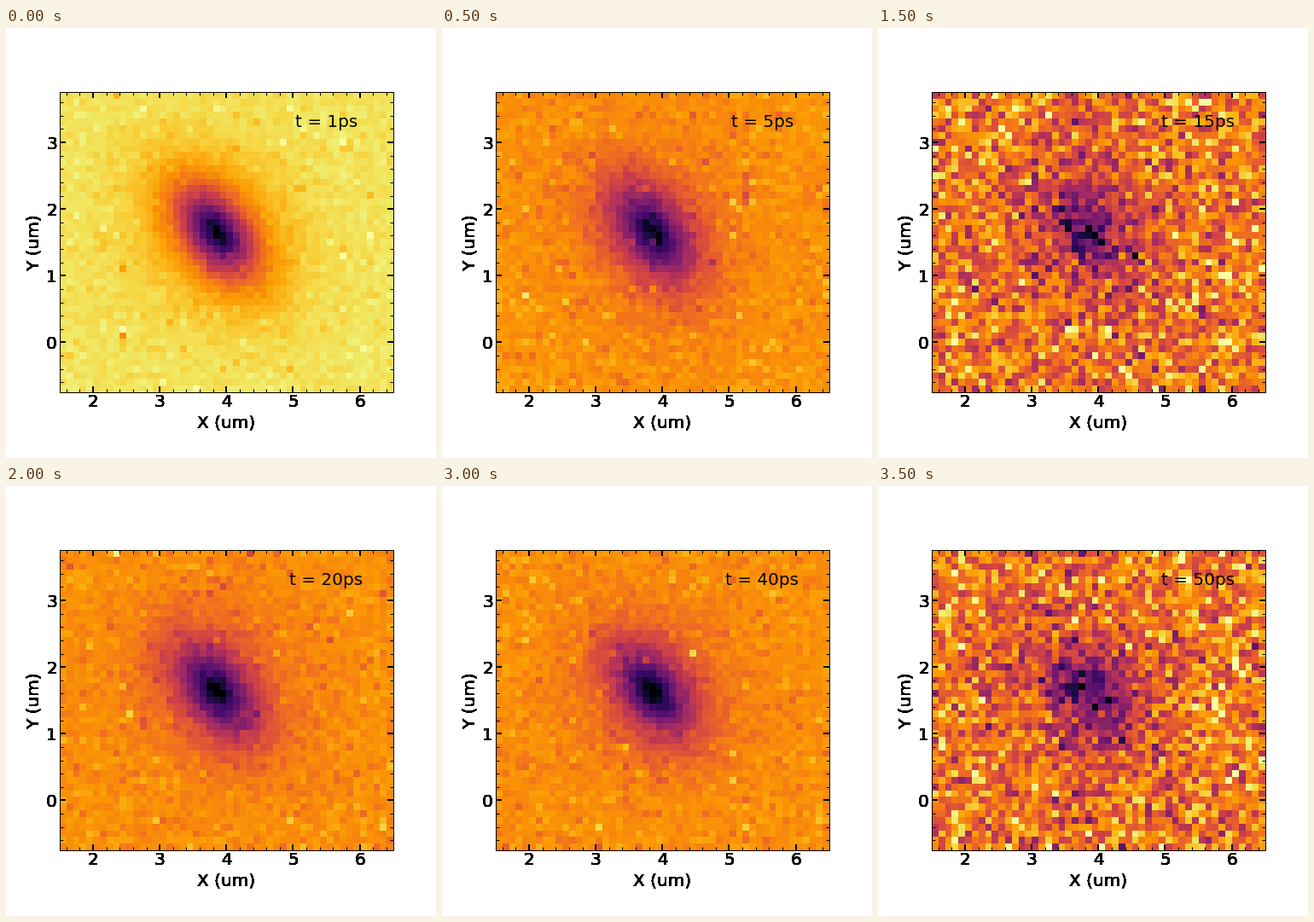
These frames come from a looping animation (504x504 px, 4000 ms). A matplotlib script:

```python
import numpy as np
import matplotlib.pyplot as plt
from matplotlib.animation import FuncAnimation
from matplotlib.ticker import MultipleLocator

SIZE, DPI, FONT = 504, 72, 20
COLS, ROWS = 50, 45
X0, X1, Y0, Y1 = 1.5, 6.5, -0.75, 3.75
BOX = [0.125, 77 / SIZE, 0.775, 0.775 * ROWS / COLS]
DELAYS = [1, 5, 10, 15, 20, 30, 40, 50]
NOISY = {15, 50}

x = np.linspace(X0 + 0.05, X1 - 0.05, COLS)
y = np.linspace(Y1 - 0.05, Y0 + 0.05, ROWS)
dx, dy = np.meshgrid(x - 3.85, y - 1.65)

# tilted, sharply peaked spot inside a wide round glow
radius = np.hypot((0.6 * dx - 0.8 * dy) / 0.68, (0.8 * dx + 0.6 * dy) / 0.40)
core = np.exp(-radius ** 1.4)
halo = np.exp(-0.5 * (dx ** 2 + dy ** 2) / 0.95 ** 2)


def scan(delay):
    rng = np.random.default_rng(delay)
    shape = (ROWS, COLS)
    if delay in NOISY:
        data = 0.71 - 0.45 * core - 0.12 * halo
        data += 0.135 * rng.standard_normal(shape)
    else:
        early = np.exp(1 - delay)
        level = 0.76 + 0.17 * early
        data = level - (level - 0.07) * core - 0.09 * halo
        data += (0.025 - 0.011 * early) * rng.standard_t(5, shape)
    return np.clip(data, 0, 1)


def add_labels(ax):
    ax.set(xlim=(X0, X1), ylim=(Y0, Y1))
    for axis in (ax.xaxis, ax.yaxis):
        axis.set_major_locator(MultipleLocator(1))
    ax.tick_params(labelsize=FONT, length=0)
    ax.tick_params(axis="x", pad=2)
    ax.tick_params(axis="y", pad=3)
    ax.set_xlabel("X (um)", fontsize=FONT, labelpad=5.5)
    ax.set_ylabel("Y (um)", fontsize=FONT, labelpad=4.5)


plt.rcParams["font.family"] = "DejaVu Sans"
fig = plt.figure(figsize=(SIZE / DPI, SIZE / DPI), dpi=DPI, facecolor="white")
ax = fig.add_axes(BOX)
image = ax.imshow(np.zeros((ROWS, COLS)), cmap="inferno", vmin=0, vmax=1,
                  extent=(X0, X1, Y0, Y1), interpolation="nearest",
                  aspect="auto")
add_labels(ax)
for axis in (ax.xaxis, ax.yaxis):
    axis.set_minor_locator(MultipleLocator(0.2))
ax.tick_params(which="both", direction="in", top=True, right=True)
ax.tick_params(which="major", length=7, width=2)
ax.tick_params(which="minor", length=4, width=1)
ax.spines[:].set_linewidth(1)
caption = ax.text(0.8, 0.9, "", transform=ax.transAxes, fontsize=FONT,
                  ha="center", va="center")

# stacked copies of the labels give them their heavy edges
for i in range(18):
    layer = fig.add_axes(BOX, facecolor="none", label=f"layer {i}")
    add_labels(layer)
    layer.spines[:].set_visible(False)

scans = [scan(delay) for delay in DELAYS]


def update(i):
    image.set_data(scans[i])
    caption.set_text(f"t = {DELAYS[i]}ps")
    return image, caption


anim = FuncAnimation(fig, update, frames=len(DELAYS), interval=500,
                     repeat=True, repeat_delay=0)
plt.show()
```
